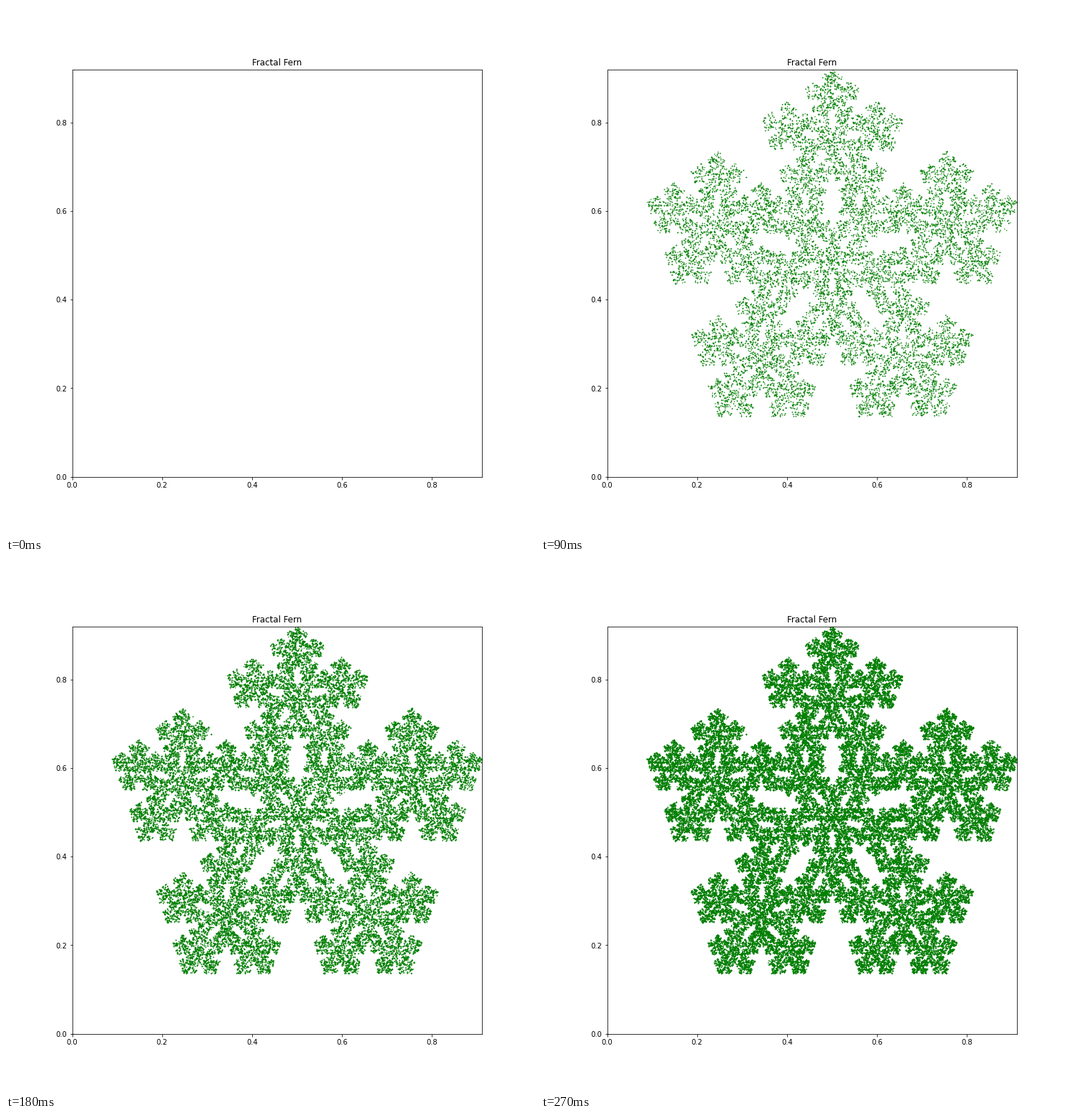
These frames come from a looping animation (748 px wide and 748 px high, 0.3 s). A matplotlib script:

```python
import random

import matplotlib.pyplot as plt
import numpy as np
from matplotlib.animation import FuncAnimation

FRAMES = 10
STEP = 5000  # points added per frame

# Affine maps: x' = a x + b y + e, y' = c x + d y + f
MAPS = [
    (0.382, 0, 0, 0.382, 0.309, 0.57),
    (0.118, -0.3633, 0.3633, 0.118, 0.3633, 0.3306),
    (0.118, 0.3633, -0.3633, 0.118, 0.5187, 0.694),
    (-0.309, -0.2245, 0.2245, -0.309, 0.607, 0.309),
    (-0.309, 0.2245, -0.2245, -0.309, 0.7016, 0.5335),
    (0.382, 0, 0, -0.382, 0.309, 0.677),
]


def chaos_game(count, seed=4):
    """Iterate randomly chosen maps, starting at the origin."""
    rng = random.Random(seed)
    points = np.zeros((count, 2))
    x = y = 0.0
    for i in range(1, count):
        a, b, c, d, e, f = MAPS[-1] if i == 1 else rng.choice(MAPS)
        x, y = a * x + b * y + e, c * x + d * y + f
        points[i] = x, y
    return points


points = chaos_game(STEP * (FRAMES - 1))

plt.rcParams["font.family"] = "DejaVu Sans"
fig, ax = plt.subplots(figsize=(10.39, 10.39), dpi=72)
ax.set_title("Fractal Fern")
ax.set_xlim(0, 0.9115)
ax.set_ylim(0, 0.9198)
ticks = [0, 0.2, 0.4, 0.6, 0.8]
ax.set_xticks(ticks)
ax.set_yticks(ticks)

# Each layer redraws all earlier points, so older dots grow darker.
layers = [
    ax.plot(*points[:STEP * n].T, ".", color="green", markersize=1,
            visible=False)[0]
    for n in range(1, FRAMES)
]


def update(frame):
    for n, layer in enumerate(layers, 1):
        layer.set_visible(n <= frame)
    return layers


anim = FuncAnimation(fig, update, frames=FRAMES, interval=30,
                     repeat=True, repeat_delay=0, blit=False)
plt.show()
```
